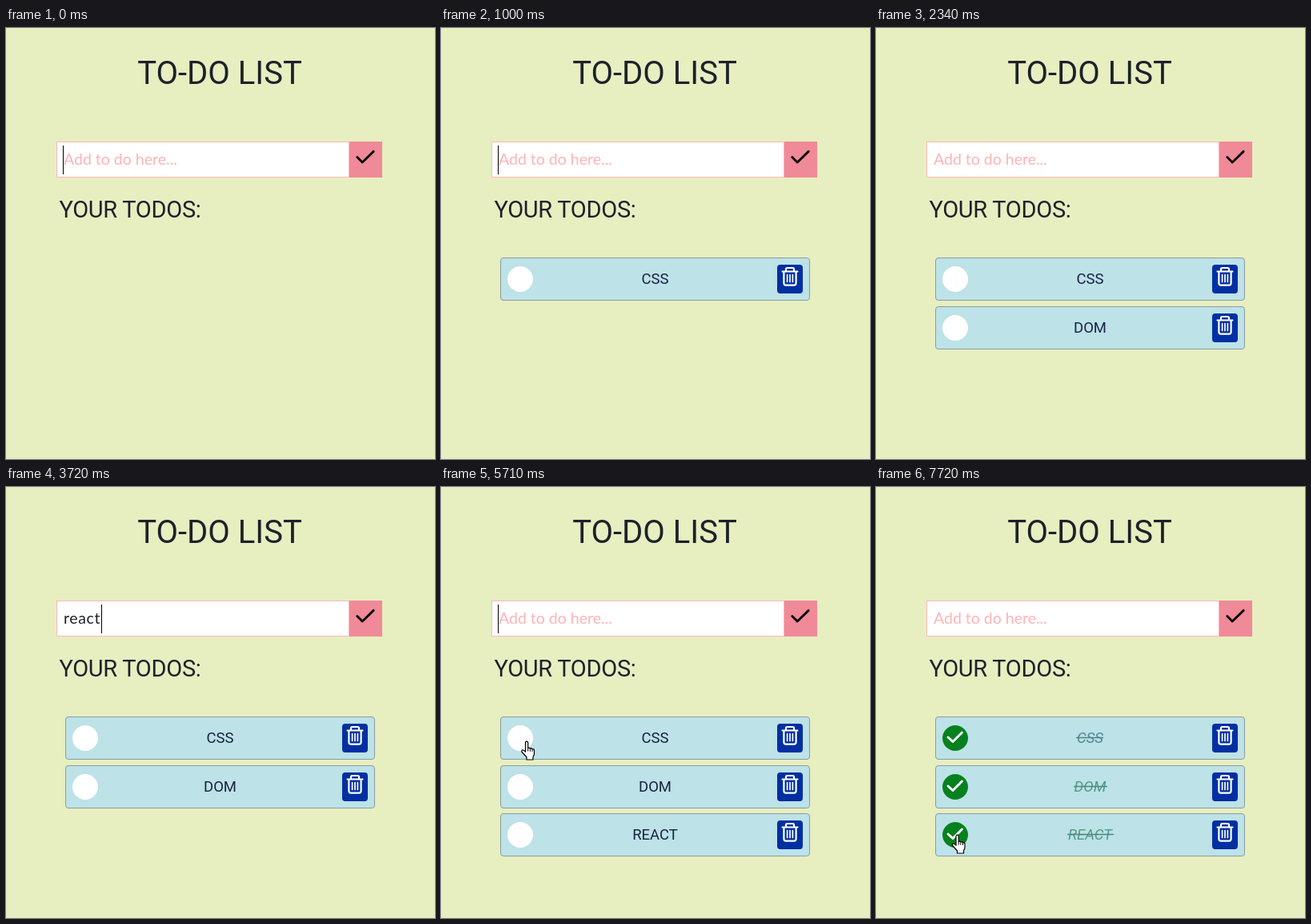
An HTML page that plays this animation: 536x539 px, repeating every 8 s.

```html
<!DOCTYPE html>
<html lang="en">
<head>
<meta charset="utf-8">
<title>To-do list</title>
<style>
  html, body { margin: 0; width: 100%; height: 100%; overflow: hidden; background: #e7eec0; }
  svg { display: block; }
  text { font: 20px Roboto, "Open Sans", sans-serif; fill: #1d2129; }
  .entry { font: 19.5px Lato, "Open Sans", sans-serif; }
  .mid { text-anchor: middle; }
  .item text { font-size: 18.5px; fill: #182142; }
  .line { fill: none; stroke-linecap: round; stroke-linejoin: round; }
  .tick, .strike { visibility: hidden; }
  .done .tick, .done .strike { visibility: visible; }
  .done text { font-style: italic; fill: var(--done); }
</style>
</head>
<body>
<svg width="536" height="539" viewBox="0 0 536 539">
  <defs>
    <g id="bin">
      <rect x="420" y="9" width="32" height="36" rx="4" fill="#002fa2"/>
      <path class="line" stroke="#fff" stroke-width="2.2"
        d="M426.5 17.5h19M431 17v-2.5q0-1.5 1.5-1.5h7q1.5 0 1.5 1.5V17M428.4 18v14q0 2.6 2.6 2.6h10q2.6 0 2.6-2.6V18"/>
      <path class="line" stroke="#fff" stroke-width="1.7" d="M432.6 21.5v9M436 21.5v9M439.4 21.5v9"/>
    </g>
  </defs>

  <text class="mid" x="267" y="69.5" style="font-size:40px">TO-DO LIST</text>
  <text x="66.5" y="236.5" style="font-size:29px;letter-spacing:-.3px">YOUR TODOS:</text>

  <rect x="63.5" y="142.5" width="365" height="44" fill="#fff" stroke="#ffb6bf"/>
  <rect x="429" y="142" width="41" height="45" fill="#f08a98"/>
  <path class="line" stroke="#080808" stroke-width="2.9" d="M438.8 161.5l6.4 6.5 14-13.6"/>
  <text id="hint" class="entry" x="72" y="171" style="fill:#ffb3b6">Add to do here...</text>
  <text id="typed" class="entry" x="72" y="171" style="letter-spacing:.6px"></text>
  <rect id="caret" y="147" width="1" height="36" fill="#000"/>

  <g id="list"></g>

  <g stroke="#000" fill="#fff" stroke-linejoin="round">
    <path id="arrow" d="M.5.5v16l3.7-3.5 2.5 5.8 2.4-1-2.5-5.6h5z"/>
    <g id="hand">
      <path stroke-width="1.2" d="M5.5 2.2a1.6 1.6 0 0 1 3.2 0V9q1.3-1 2.6.5 1.4-.9 2.5.6 2.7-.3 2.7 2V16q0 2-1.5 4v3.5H7v-3L1.2 14q-1-2 .6-2.6 1.3-.4 3.7 2.3z"/>
      <path fill="none" d="M8.7 9v4M11.4 9.7v3.6M14 10.4v3"/>
    </g>
  </g>
</svg>

<script>
const $ = id => document.getElementById(id);

// name, green shade when done, strike-through start and end
const items = [
  ["CSS", "#508899", 250, 284],
  ["DOM", "#4a9f7e", 247, 289],
  ["REACT", "#4a9f7e", 239, 297]
];

$("list").innerHTML = items.map(([name, shade, x1, x2], i) => `
  <g class="item" transform="translate(0 ${Math.round(287 + i * 60.5)})" style="--done:${shade}">
    <rect x="74.5" y=".5" width="386" height="53" rx="3.5" fill="#bde2e8" stroke="#8b9c9f"/>
    <circle cx="99" cy="27" r="16" fill="#fff"/>
    <g class="tick">
      <circle cx="99" cy="27" r="16" fill="#06811f"/>
      <path class="line" stroke="#fff" stroke-width="3" d="M90 26l6 5.5 11.5-11.5"/>
    </g>
    <text class="mid" x="267.5" y="32.5">${name}</text>
    <path class="strike" stroke="#587f83" stroke-width="1.3" d="M${x1} 26.5H${x2}"/>
    <use href="#bin"/>
  </g>`).join("");
const rows = [...document.querySelectorAll(".item")];

// time, typed text, caret x (0 = hidden), items listed, items done, pointer x, y
const steps = [
  [0, "", 71, 0, 0],
  [330, "c", 80, 0, 0],
  [700, "css", 100, 0, 0],
  [1000, "", 71, 1, 0],
  [1330, "do", 92, 1, 0],
  [1660, "dom", 108, 1, 0],
  [1990, "dom", 0, 1, 0],
  [2340, "", 0, 2, 0],
  [2670, "r", 79, 2, 0],
  [3040, "rea", 102, 2, 0],
  [3380, "reac", 110, 2, 0],
  [3720, "react", 119, 2, 0],
  [4050, "", 71, 3, 0],
  [4390, "", 0, 3, 0],
  [4720, "", 71, 3, 0],
  [5380, "", 0, 3, 0, 292, 367],
  [5710, "", 71, 3, 0, 100, 317.5],
  [6040, "", 0, 3, 1, 96, 314],
  [6370, "", 0, 3, 1, 97, 371],
  [6710, "", 0, 3, 2, 97, 371],
  [7040, "", 0, 3, 2, 100.5, 426],
  [7380, "", 0, 3, 3, 100.5, 426],
  [7720, "", 0, 3, 3, 94.5, 434.5]
];

const show = (el, on) => el.setAttribute("visibility", on ? "visible" : "hidden");

function draw(now) {
  const t = now % 8000;
  const [start, typed, caret, listed, done, x, y] = steps.findLast(s => s[0] <= t);
  $("typed").textContent = typed;
  show($("hint"), !typed);
  show($("caret"), caret);
  $("caret").setAttribute("x", caret);
  rows.forEach((row, i) => {
    row.style.display = i < listed ? "" : "none";
    row.classList.toggle("done", i < done);
  });
  for (const id of ["arrow", "hand"]) {
    show($(id), x && (id === "arrow") === (start === 5380));
    $(id).setAttribute("transform", `translate(${x || 0} ${y || 0})`);
  }
}

const origin = performance.now();
function tick() {
  draw(performance.now() - origin);
  requestAnimationFrame(tick);
}
tick();
</script>
</body>
</html>
```
